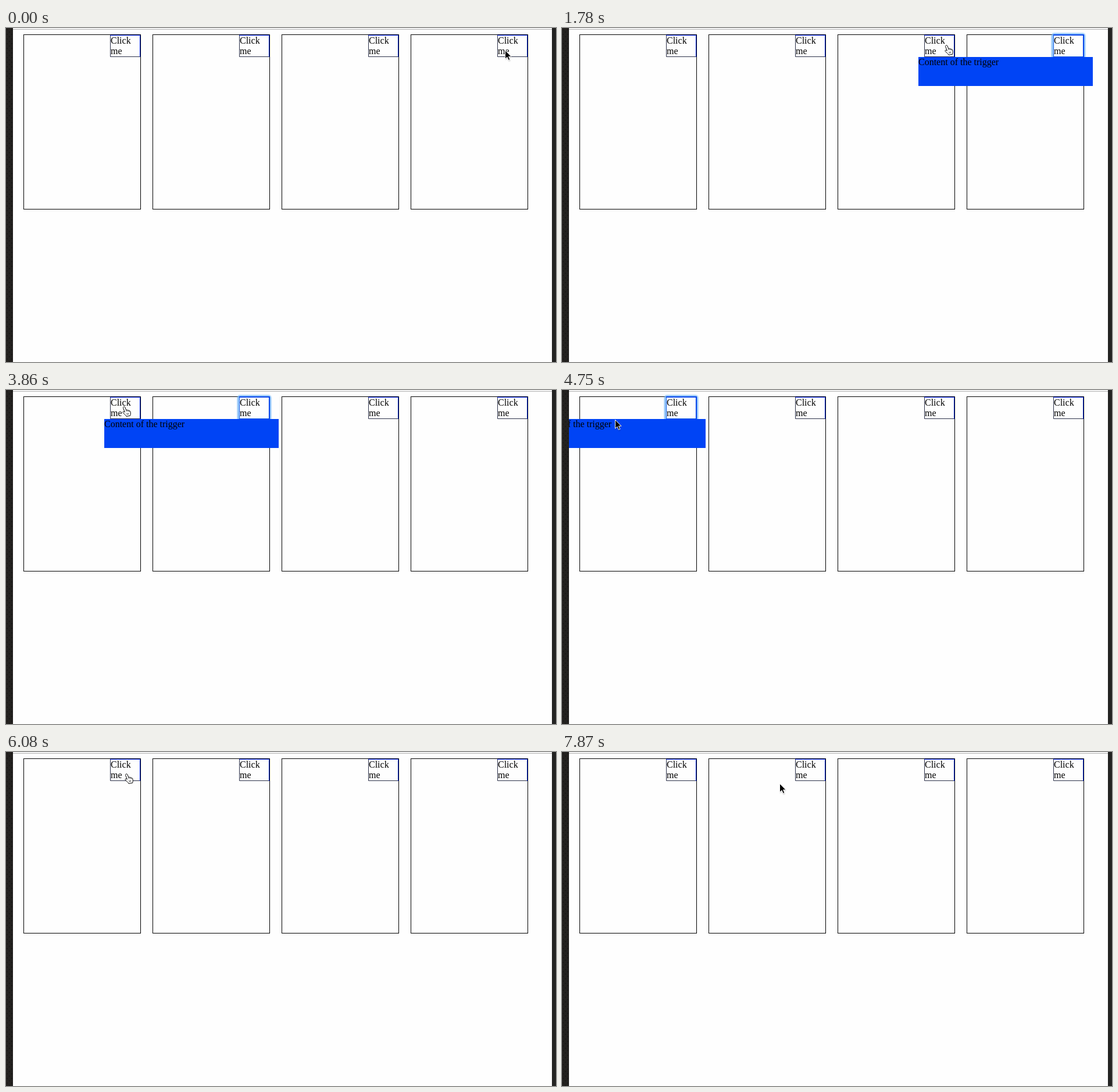
Recreate the animation shown at these times as an HTML page. Size 946 px wide and 576 px high, loop 8000 ms.

```html
<!DOCTYPE html>
<html lang="en">
<head>
<meta charset="utf-8">
<title>Popup triggers</title>
<style>
  html, body { margin: 0; width: 100%; height: 100%; overflow: hidden; background: #fefefe; }
  svg { display: block; }
  text { font: 16px "Liberation Serif", "Times New Roman", serif; }
</style>
</head>
<body>
<svg width="946" height="576" viewBox="0 0 946 576">
  <defs>
    <pattern id="weave" width="8" height="8" patternUnits="userSpaceOnUse">
      <rect width="8" height="8" fill="#23211f"/>
      <path d="M1 2h2v2h-2zM5 6h2v2h-2z" fill="#1a1917"/>
    </pattern>
    <clipPath id="window"><rect x="12" width="927" height="576"/></clipPath>
    <filter id="soft" x="-50%" y="-50%" width="200%" height="200%">
      <feGaussianBlur stdDeviation="0.8"/>
    </filter>
    <g id="panel">
      <rect x=".5" y=".5" width="201" height="301" fill="none" stroke="#000"/>
      <path d="M149.500 1V38.500H201" fill="none" stroke="#2b3048"/>
      <path d="M149 1.500H200.500V39" fill="none" stroke="#0022f0"/>
      <text x="150" y="16">Click</text>
      <text x="150" y="34">me</text>
    </g>
  </defs>
  <rect width="946" height="576" fill="#fefefe"/>
  <rect width="946" height="2" fill="#f4f4f4"/>
  <rect y="2" width="946" height="1" fill="#b6b6b6"/>
  <rect width="12" height="576" fill="url(#weave)"/>
  <rect x="939" width="7" height="576" fill="#232322"/>
  <g id="panels"></g>
  <g clip-path="url(#window)">
    <g id="ring" fill="none">
      <rect x="147.500" y="-.5" width="55" height="41" rx="3" stroke="#6fb4f8" stroke-width="3" filter="url(#soft)"/>
      <rect x="149.500" y="1.500" width="51" height="37" stroke="#1c5fe0"/>
      <path d="M149 1H201V39" stroke="#0a45ea" stroke-width="2"/>
    </g>
    <g id="popup">
      <rect width="300" height="50" fill="#0044f5"/>
      <text y="14">Content of the trigger</text>
    </g>
  </g>
  <g id="arrow">
    <path d="M1 2V17L4.500 14 7 19.500 9.500 18.500 7 13H11.500Z" opacity=".25" filter="url(#soft)"/>
    <path d="M.5.5V15.300L4 12.200 6.400 17.500 8.900 16.400 6.500 11.200H11Z" stroke="#fff"/>
  </g>
  <g id="hand" stroke="#000" stroke-linejoin="round">
    <path fill="#fff" d="M2.200 1.200C3.200.4 4.600.9 5 2L6.600 6.600C7.400 5.900 8.800 6.200 9.200 7.100 10 6.500 11.200 6.900 11.600 7.800 12.600 7.400 13.600 8.100 13.900 9.200L14.300 12C14.500 13.600 13.900 14.700 13.600 16.300L7 17.500C6 15 3.500 13.600 1.300 11.400 .3 10 1.300 8.800 2.600 9.300L4.300 10.200 1.700 3.300C1.300 2.500 1.500 1.600 2.200 1.200Z"/>
    <path fill="none" stroke-width=".8" d="M6.600 6.600 7.400 9M9.200 7.100 9.900 9.200M11.600 7.800 12.200 9.600M7.800 12 8.700 14.800M10 11.600 10.700 14.400"/>
  </g>
</svg>
<script>
const LOOP = 8000, TICK = 148.4;
const NONE = -1;
const byId = id => document.getElementById(id);
const panelX = i => 30 + 222 * i;

byId("panels").innerHTML = [0, 1, 2, 3]
  .map(i => `<use href="#panel" x="${panelX(i)}" y="11"/>`).join("");

// Pointer path: [tick, x, y, shape]
const pointer = [
  [0, 858, 38, "arrow"], [1, 857, 45, "arrow"], [2, 856, 55, "arrow"],
  [4, 856, 48, "arrow"], [5, 853, 36, "hand"],
  [8, 846, 36, "hand"], [9, 800, 40, "arrow"], [10, 725, 41, "arrow"],
  [11, 670, 33, "hand"], [12, 658, 29, "hand"],
  [16, 630, 37, "hand"], [17, 545, 44, "arrow"], [18, 437, 36, "hand"], [19, 421, 32, "hand"],
  [23, 380, 40, "arrow"], [24, 285, 42, "arrow"], [25, 208, 31, "hand"], [26, 200, 28, "hand"],
  [30, 184, 33, "hand"], [31, 125, 48, "arrow"], [32, 91, 51, "arrow"],
  [33, 88, 72, "arrow"], [34, 94, 118, "arrow"], [35, 102, 164, "arrow"],
  [38, 116, 148, "arrow"], [39, 158, 96, "arrow"], [40, 200, 46, "hand"], [41, 204, 37, "hand"],
  [46, 194, 120, "arrow"], [47, 186, 193, "arrow"], [53, 374, 54, "arrow"]
];

// Panel index from each tick on: [tick, index]
const focus = [[0, NONE], [3, 0], [7, 3], [14, 2], [21, 1], [27, 0], [36, NONE], [42, 0], [52, NONE]];
const opened = focus.filter(([tick]) => tick !== 3);

const current = (track, tick) => track.findLast(key => key[0] <= tick);

function place(id, visible, x, y) {
  const node = byId(id);
  node.style.display = visible ? "" : "none";
  node.setAttribute("transform", `translate(${x} ${y})`);
}

function draw(time) {
  const tick = Math.floor((time % LOOP + 6) / TICK);
  const [, x, y, shape] = current(pointer, tick);
  const [, focused] = current(focus, tick);
  const [, open] = current(opened, tick);
  place("ring", focused !== NONE, panelX(focused), 11);
  place("popup", open !== NONE, panelX(open) - 83, 50);
  for (const id of ["arrow", "hand"]) place(id, id === shape, x, y);
}

const start = performance.now();
function loop() {
  draw(performance.now() - start);
  requestAnimationFrame(loop);
}
loop();
</script>
</body>
</html>
```
